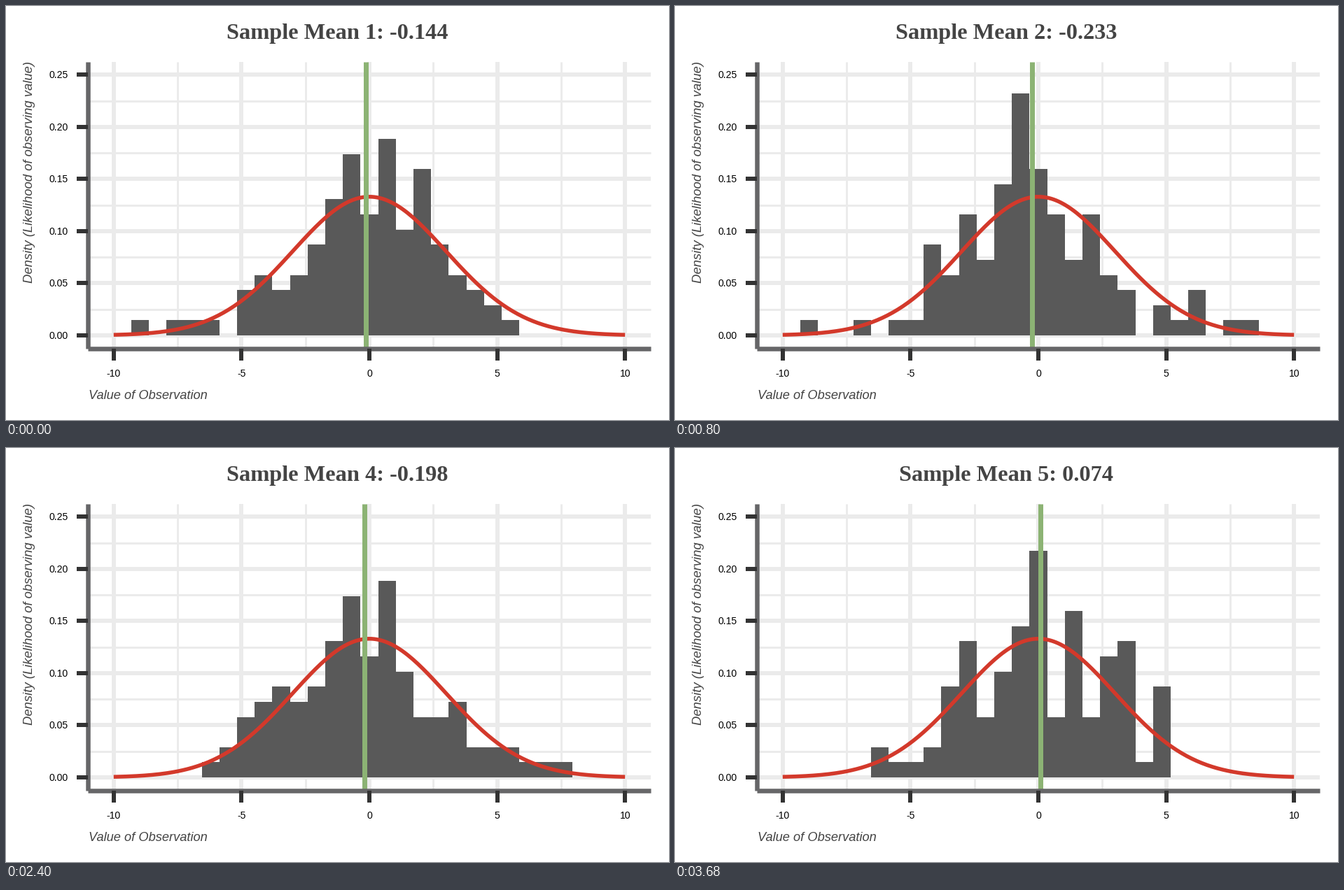
Recreate the animation shown at these times as a matplotlib script. Size 947 px wide and 592 px high, loop 4 s.

```python
import numpy as np
import matplotlib.pyplot as plt
from matplotlib.animation import FuncAnimation

W, H, DPI = 947, 592, 64
PT = 72 / DPI                      # points per pixel
LEFT, RIGHT, TOP, BOTTOM = 117.4, 921, 79.7, 489.7
GRID, BAR, CURVE, MEAN = "#ebebeb", "#595959", "#d3392b", "#8cb374"
AXIS, TICK, INK = "#666668", "#333333", "#444444"
BIN = 20 / 29

# mean, index of the first bin, observations per bin
SAMPLES = [
    (-0.144, -13, [1, 0, 1, 1, 1, 0, 3, 4, 3, 4, 6, 9, 12, 8, 13, 7, 11, 6, 4, 3, 2, 1]),
    (-0.233, -13, [1, 0, 0, 1, 0, 1, 1, 6, 4, 8, 5, 10, 16, 11, 8, 5, 8, 4, 3, 0, 2, 1,
                   3, 0, 1, 1]),
    (0.159, -10, [1, 3, 2, 1, 4, 1, 5, 9, 12, 2, 5, 16, 9, 8, 8, 2, 5, 1, 3, 3]),
    (-0.198, -9, [1, 2, 4, 5, 6, 5, 6, 9, 12, 8, 13, 7, 4, 4, 5, 2, 2, 2, 1, 1, 1]),
    (0.074, -9, [2, 1, 1, 2, 6, 9, 4, 7, 10, 15, 4, 11, 4, 8, 9, 1, 6]),
]


def px(x):
    return 519 + 36.52 * x


def py(y):
    return 471 - 1490.8 * y


fig = plt.figure(figsize=(W / DPI, H / DPI), dpi=DPI, facecolor="white")
ax = fig.add_axes([0, 0, 1, 1])
ax.set(xlim=(0, W), ylim=(H, 0))
ax.axis("off")


def line(xs, ys, color, width, z):
    return ax.plot(xs, ys, color=color, lw=width * PT, zorder=z,
                   solid_capstyle="butt")[0]


def label(x, y, text, size, color=INK, family="Liberation Sans", **kw):
    return ax.text(x, y, text, fontsize=size * PT, color=color, family=family,
                   zorder=8, **kw)


# grid, minor lines below major ones
for x in np.arange(-7.5, 10, 5):
    line([px(x)] * 2, [TOP, BOTTOM], GRID, 3, 0)
for y in np.arange(0.025, 0.25, 0.05):
    line([LEFT, RIGHT], [py(y)] * 2, GRID, 3, 0)
for x in range(-10, 11, 5):
    line([px(x)] * 2, [TOP, BOTTOM], GRID, 6, 1)
    line([px(x)] * 2, [BOTTOM, 506.5], TICK, 6, 7)
    label(px(x), 529.5, str(x), 14, "black", ha="center")
for y in np.arange(0, 0.26, 0.05):
    line([LEFT, RIGHT], [py(y)] * 2, GRID, 6, 1)
    line([101, LEFT], [py(y)] * 2, TICK, 6, 7)
    label(88.5, py(y) + 5, f"{y:.2f}", 14, "black", ha="right")

line([LEFT, LEFT], [TOP, BOTTOM], AXIS, 6.5, 6)
line([LEFT, RIGHT], [BOTTOM, BOTTOM], AXIS, 6.5, 6)

label(118, 562, "Value of Observation", 18.3, style="italic")
label(38.5, 79.5, "Density (Likelihood of observing value)", 18.5, style="italic",
      rotation=90, rotation_mode="anchor", ha="right", va="baseline")

# normal density with a standard deviation of 3
xs = np.linspace(-10, 10, 201)
line(px(xs), py(np.exp(-xs**2 / 18) / (3 * np.sqrt(2 * np.pi))), CURVE, 5.5, 4)

bars = ax.stairs([0], [0, 1], baseline=py(0), fill=True, color=BAR, lw=0, zorder=2)
mean_line = line([0, 0], [TOP, BOTTOM], MEAN, 7, 5)
title = label(W / 2, 46.5, "", 32.4, family="Liberation Serif", weight="bold",
              ha="center")


def update(i):
    mean, first, counts = SAMPLES[i]
    density = np.array(counts) / (sum(counts) * BIN)
    edges = (first - 0.5 + np.arange(len(counts) + 1)) * BIN
    bars.set_data(py(density), px(edges), py(0))
    mean_line.set_xdata([px(mean)] * 2)
    title.set_text(f"Sample Mean {i + 1}: {mean:.3f}")
    return bars, mean_line, title


anim = FuncAnimation(fig, update, frames=len(SAMPLES), interval=800, repeat=True,
                     repeat_delay=0)
plt.show()
```
